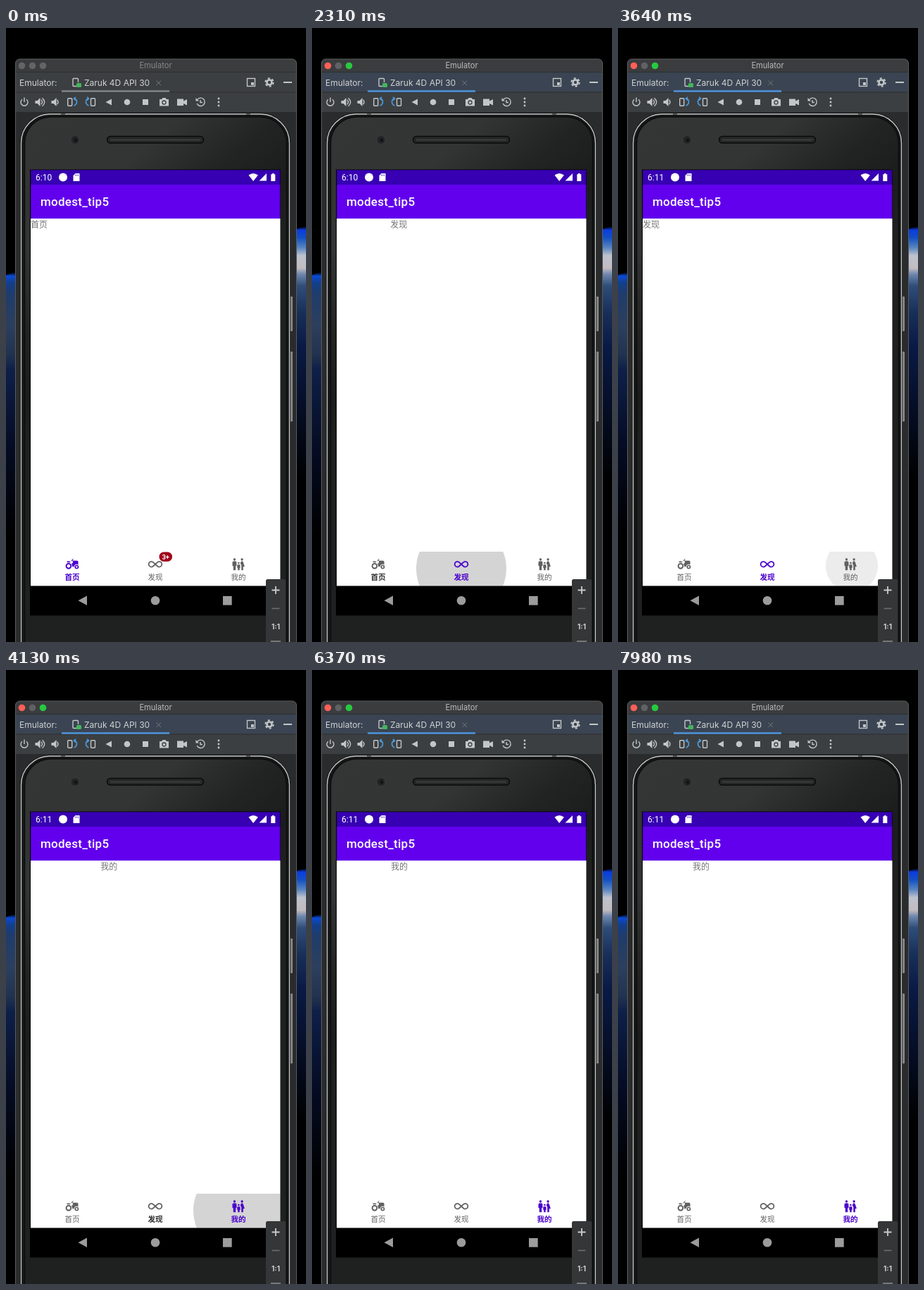
These frames come from a looping animation (426x870 px, 8000 ms). An HTML page:

```html
<!DOCTYPE html>
<html lang="zh">
<head>
<meta charset="utf-8">
<title>Emulator</title>
<style>
  html, body { margin: 0; width: 100%; height: 100%; overflow: hidden; background: #000; }
  svg { display: block; }
  text { white-space: pre; }
  .ui { font-family: Inter, sans-serif; font-size: 12px; fill: #d0d2d3; }
  .app { font-family: Roboto, sans-serif; fill: #fff; }
  .cjk { font-family: "Noto Sans CJK SC", "Noto Sans CJK", "Noto Sans", sans-serif; }
  .page { font-size: 12px; fill: #767676; }
  .label { font-size: 10.6px; text-anchor: middle; }
  .line { fill: none; stroke: #c3c6c8; stroke-width: 1.4; }
  .fill { fill: #c3c6c8; }
  .blue { fill: none; stroke: #4a9be0; stroke-width: 1.7; }
</style>
</head>
<body>
<svg width="426" height="870" viewBox="0 0 426 870">
  <defs>
    <linearGradient id="skyL" gradientUnits="userSpaceOnUse" x1="0" y1="346" x2="0" y2="720">
      <stop offset="0" stop-color="#000"/>
      <stop offset=".015" stop-color="#0a4ad6"/>
      <stop offset=".04" stop-color="#123f8c"/>
      <stop offset=".08" stop-color="#1f3c6c"/>
      <stop offset=".2" stop-color="#2c3f5e"/>
      <stop offset=".31" stop-color="#22334f"/>
      <stop offset=".37" stop-color="#0e1f48"/>
      <stop offset=".65" stop-color="#050c24"/>
      <stop offset="1" stop-color="#000"/>
    </linearGradient>
    <linearGradient id="skyR" gradientUnits="userSpaceOnUse" x1="0" y1="281" x2="0" y2="640">
      <stop offset="0" stop-color="#000"/>
      <stop offset=".015" stop-color="#0b3ce0"/>
      <stop offset=".045" stop-color="#1250c4"/>
      <stop offset=".085" stop-color="#5a86c0"/>
      <stop offset=".115" stop-color="#bdc2ce"/>
      <stop offset=".165" stop-color="#c3bcc0"/>
      <stop offset=".19" stop-color="#6d86ad"/>
      <stop offset=".235" stop-color="#2f4d7a"/>
      <stop offset=".34" stop-color="#182f58"/>
      <stop offset=".47" stop-color="#0a1a46"/>
      <stop offset="1" stop-color="#000"/>
    </linearGradient>
    <linearGradient id="shell" gradientUnits="userSpaceOnUse" x1="26" y1="126" x2="260" y2="400">
      <stop offset="0" stop-color="#343535"/>
      <stop offset=".4" stop-color="#333434"/>
      <stop offset=".65" stop-color="#222323"/>
      <stop offset=".85" stop-color="#1b1c1c"/>
      <stop offset="1" stop-color="#1f2020"/>
    </linearGradient>
    <clipPath id="screen"><rect x="35" y="201" width="354.500" height="589.500"/></clipPath>
    <clipPath id="bar"><rect x="35" y="742" width="354.500" height="48.500"/></clipPath>
  </defs>

  <path d="M0 350L14 345V790H0z" fill="url(#skyL)"/>
  <path d="M412 285L426 281V640H412z" fill="url(#skyR)"/>

  <!-- window -->
  <path d="M13.500 880V50a6 6 0 0 1 6-6H406.500a6 6 0 0 1 6 6V880z" fill="#2a2b2c"/>
  <path d="M13.500 119V50a6 6 0 0 1 6-6H406.500a6 6 0 0 1 6 6V119z" fill="#3c3f41"/>
  <path d="M14 63V50a6 6 0 0 1 6-6H406a6 6 0 0 1 6 6V63z" fill="#3b3c3e"/>
  <rect id="strip" x="14" y="63" width="398" height="27.500"/>
  <path d="M14 62.500H412M14 91H412" stroke="#2c2e30"/>
  <path d="M13.500 880V50a6 6 0 0 1 6-6H406.500a6 6 0 0 1 6 6V880" fill="none" stroke="#5a5c5e"/>
  <g id="lights"><circle cx="22.500" cy="53.500" r="4.800"/><circle cx="37.500" cy="53.500" r="4.800"/><circle cx="52.500" cy="53.500" r="4.800"/></g>
  <text id="title" class="ui" x="212.500" y="57" text-anchor="middle" style="font-size:11.100px">Emulator</text>
  <text class="ui" x="19" y="82">Emulator:</text>
  <path class="line" d="M100 82.500H96a1 1 0 0 1-1-1V72.500a1 1 0 0 1 1-1h5.500a1 1 0 0 1 1 1V77"/>
  <rect x="100" y="78" width="7" height="6" rx="1.500" fill="#41b65b"/>
  <text class="ui" x="111" y="82">Zaruk 4D API 30</text>
  <path d="M213.500 74.500l6.500 6.500m0-6.500l-6.500 6.500" stroke="#76797b"/>
  <rect id="underline" x="79" y="88" width="153" height="3"/>
  <g class="line">
    <rect x="342.500" y="71.500" width="11" height="11"/>
    <path d="M394 77H406" stroke-width="2"/>
    <circle cx="374" cy="77" r="3.500" stroke-width="2.600"/>
    <circle cx="374" cy="77" r="5.700" stroke-width="2" stroke-dasharray="3 2.970"/>
  </g>
  <rect class="fill" x="348" y="77" width="4" height="4"/>

  <!-- toolbar -->
  <g class="line">
    <path d="M23 101.200a5 5 0 1 0 6 0M26 98.500V105"/>
    <path d="M50 101.800q3 3.200 0 6.400M51.500 99.300q6.500 5.700 0 11.400"/>
    <path d="M72.500 101.800q3 3.200 0 6.400"/>
    <rect x="87.700" y="99.700" width="6" height="10.600" rx="1"/>
    <rect x="120.500" y="99.700" width="6" height="10.600" rx="1"/>
    <path d="M271.500 102a5.700 5.700 0 1 1-.3 5M276 102v3.500h3"/>
  </g>
  <path class="blue" d="M96.500 100q4 .5 4 4.500t-4 5.500M99 98l-2.500 2 2.500 2.500M117.500 100q-4 .5-4 4.500t4 5.500M115 98l2.500 2-2.500 2.500"/>
  <g class="fill">
    <path d="M41.500 103h3l4-4v12l-4-4h-3zM64.500 103h3l4-4v12l-4-4h-3z"/>
    <path d="M150 100.500v9l-8.500-4.500zM194 101h8v8h-8zM269.500 99l4.500 4.500h-4.500z"/>
    <circle cx="172" cy="105" r="4.300"/>
    <path d="M218 101h3l1.500-2h4l1.500 2h3v9.500h-13z"/>
    <path d="M243 100.500h9v3l5-2.500v8.500l-5-2.500v3h-9z"/>
    <circle cx="302" cy="100" r="1.400"/><circle cx="302" cy="105" r="1.400"/><circle cx="302" cy="110" r="1.400"/>
  </g>
  <circle cx="224.500" cy="105.500" r="2.500" fill="none" stroke="#3c3f41" stroke-width="1.300"/>

  <!-- phone -->
  <path d="M404 381h2.500v48H404zM404 459h2.500v98H404z" fill="#77797a" stroke="#a9abac" stroke-width=".7"/>
  <rect x="20.500" y="121" width="383" height="800" rx="42" fill="#111" stroke="#0b0b0b"/>
  <rect x="21.500" y="122" width="381" height="800" rx="41" fill="#161717" stroke="#c7c9ca" stroke-width="1.400"/>
  <rect x="26.500" y="126" width="372" height="800" rx="37" fill="url(#shell)" stroke="#0c0c0c" stroke-width="1.500"/>
  <path d="M78 122h6M341 122h6" stroke="#555" stroke-width="2"/>
  <circle cx="98" cy="158.500" r="6" fill="#222324" stroke="#3a3b3b"/>
  <circle cx="99" cy="159" r="2.200" fill="#111214"/>
  <rect x="143.500" y="153.500" width="137" height="9.500" rx="4.700" fill="#252626" stroke="#0a0a0a" stroke-width="1.600"/>
  <path d="M148 158.500H276" stroke="#3c3d3d" stroke-width="2"/>

  <!-- screen -->
  <rect x="34" y="200.500" width="356" height="632" fill="#000"/>
  <rect x="35" y="201" width="354.500" height="21" fill="#3700b3"/>
  <rect x="35" y="222" width="354.500" height="48" fill="#6200ee"/>
  <path d="M35.500 270V201.500H389V270" fill="none" stroke="#000" stroke-opacity=".25"/>
  <rect x="35" y="270" width="354.500" height="520.500" fill="#fff"/>
  <text id="clock" class="app" x="42" y="216" font-size="12"></text>
  <g fill="#fff">
    <circle cx="81" cy="211.500" r="6"/>
    <path d="M98.500 206h6v11h-9v-8z"/>
    <path d="M344.500 208.500q6.700-5 13.400 0L351.200 217zM370 206v10.500H359.500zM376.300 207.300h1.700V206h2.600v1.300h1.700V217h-6z"/>
  </g>
  <path d="M98.500 207.500v2M100.500 207.500v2M102.500 207.500v2" stroke="#3700b3" stroke-width=".8"/>
  <text class="app" x="49" y="252.300" font-size="17" font-weight="500" letter-spacing=".25">modest_tip5</text>
  <g id="pages" clip-path="url(#screen)"></g>
  <g clip-path="url(#bar)"><circle id="ripple"/></g>
  <g id="tabs"></g>
  <g id="badge">
    <rect x="217.500" y="742.500" width="18.500" height="13.500" rx="6.500" fill="#a00019"/>
    <text class="app" x="226.700" y="752.500" font-size="9.500" font-weight="700" text-anchor="middle">3+</text>
  </g>
  <g fill="#9c9c9c">
    <path d="M115 804.500v13.500l-12.500-6.700z"/>
    <circle cx="212" cy="811.300" r="6.300"/>
    <rect x="308" y="805" width="12.700" height="12.700"/>
  </g>

  <!-- zoom panel -->
  <rect x="369" y="781" width="28.300" height="100" rx="2.500" fill="#343637"/>
  <path d="M377.500 796.500h11M383 791v11" stroke="#c9cbcc" stroke-width="1.800"/>
  <path d="M377.500 822.500h11" stroke="#6b6e70" stroke-width="1.600"/>
  <text class="ui" x="383" y="851.500" text-anchor="middle" style="font-size:10px;font-weight:700">1:1</text>
  <path d="M376 869h14" stroke="#8b8e90" stroke-width="1.500"/>
</svg>
<script>
const LOOP = 8000, STEP = 70, WIDTH = 355, SETTLE = 400;
const NAMES = ["首页", "发现", "我的"];
const CENTERS = [94, 212, 330];
const TAPS = [
  { tab: 1, press: 1750, release: 2204 },
  { tab: 2, press: 3640, release: 4040 }
];
const FOCUS = 1680, MINUTE = 3360;
// time, distance dragged to the right
const DRAG = [
  [6230, 0], [6300, 25], [6370, 77], [6440, 118], [6580, 150], [6650, 140],
  [6790, 45], [6930, 0], [7770, 0], [7840, 8], [7910, 35], [7980, 71]
];
const ICONS = [
  `<path d="M19.500 12c.93 0 1.780.28 2.500.76V8c0-1.100-.9-2-2-2h-6.290l-1.060-1.060 1.410-1.410-.71-.71-3.530 3.530.71.71 1.410-1.410L13 6.710V9c0 1.100-.9 2-2 2h-.54c.95 1.060 1.540 2.460 1.540 4 0 .34-.04.67-.09 1h3.140c.25-2.250 2.140-4 4.450-4zM4 9h5c0-1.100-.9-2-2-2H4c-.55 0-1 .45-1 1s.45 1 1 1z"/>
   <g fill="none" stroke="currentColor" stroke-width="2"><circle cx="19.500" cy="16.500" r="2.500"/><circle cx="6" cy="15" r="3.900" stroke-width="2.300"/></g>`,
  `<path fill="none" stroke="currentColor" stroke-width="2.100" d="M9.800 14.100L8.500 15.200C7.700 16 6.700 16.400 5.400 16.400A4.400 4.400 0 0 1 5.400 7.600C6.700 7.600 7.700 8 8.500 8.800L15.500 15.200C16.300 16 17.300 16.400 18.600 16.400A4.400 4.400 0 0 0 18.600 7.600C17.300 7.600 16.300 8 15.500 8.800L8.500 15.200"/>`,
  `<path d="M20 22v-6h2.500l-2.540-7.630A2 2 0 0 0 18.060 7h-.12a2 2 0 0 0-1.900 1.370l-.86 2.580A3.500 3.500 0 0 1 17 14v8zM7.500 22v-7H9V9a2 2 0 0 0-2-2H4a2 2 0 0 0-2 2v6h1.500v7zM14 22v-4h1v-4a1.500 1.500 0 0 0-1.500-1.500h-2A1.500 1.500 0 0 0 10 14v4h1v4z"/>
   <circle cx="18" cy="4" r="2"/><circle cx="5.500" cy="4" r="2"/><circle cx="12.500" cy="10" r="1.500"/>`
];

const $ = id => document.getElementById(id);
const clamp = v => Math.max(0, Math.min(1, v));
const set = (el, attrs) => { for (const k in attrs) el.setAttribute(k, attrs[k]); };

$("pages").innerHTML = NAMES.map(n => `<text class="cjk page" y="283">${n}</text>`).join("");
$("tabs").innerHTML = NAMES.map((n, i) => `<g>
  <g transform="translate(${CENTERS[i] - 10.2} 749.600) scale(.85)" fill="currentColor">${ICONS[i]}</g>
  <text class="cjk label" x="${CENTERS[i]}" y="782" fill="currentColor">${n}</text></g>`).join("");
const pages = [...$("pages").children], tabs = [...$("tabs").children];
const lights = [...$("lights").children];

function dragAt(t) {
  for (let i = 1; i < DRAG.length; i++) {
    const [t0, a] = DRAG[i - 1], [t1, b] = DRAG[i];
    if (t >= t0 && t <= t1) return a + (b - a) * (t - t0) / (t1 - t0);
  }
  return 0;
}

function drawWindow(t) {
  const on = t >= FOCUS;
  const colors = on ? ["#ff5f57", "#5f6163", "#28c840"] : Array(3).fill("#626466");
  lights.forEach((el, i) => set(el, { fill: colors[i] }));
  $("title").style.fill = on ? "#b9bbbc" : "#858789";
  set($("strip"), { fill: on ? "#3a4452" : "#3c3f41" });
  set($("underline"), { fill: on ? "#4a88c7" : "#747a80" });
}

function drawPages(t) {
  const pos = TAPS.reduce((p, { release }) =>
    p + 1 - (1 - clamp((t - release) / SETTLE)) ** 5, 0) - dragAt(t) / WIDTH;
  pages.forEach((el, i) => set(el, { x: 35 + WIDTH * (i - pos) }));
}

function drawTabs(t) {
  const done = TAPS.filter(p => t >= p.release);
  const current = done.length;
  const leaving = current && t - done[current - 1].release < 140 ? current - 1 : -1;
  tabs.forEach((el, i) => {
    const label = el.lastElementChild;
    el.style.color = i === current ? "#4a00cb" : "#616161";
    label.style.fill = i === leaving ? "#303030" : "currentColor";
    label.style.fontWeight = i === current || i === leaving ? 700 : 400;
  });
  $("badge").style.display = current ? "none" : "";
}

function drawRipple(t) {
  const tap = TAPS.find(p => t >= p.press && t < p.release + 360);
  const el = $("ripple");
  if (!tap) return set(el, { r: 0 });
  const age = t - tap.press, rest = 1 - clamp(age / 210);
  const fade = 1 - clamp((t - tap.release - 110) / 250);
  set(el, {
    cx: CENTERS[tap.tab] + 2 * rest,
    cy: 766 - 4 * rest,
    r: 64 * (1 - .42 * rest * rest),
    "fill-opacity": (.075 + .095 * clamp(age / 140)) * fade
  });
}

function draw(time) {
  const t = Math.floor(time % LOOP / STEP) * STEP;
  drawWindow(t);
  drawPages(t);
  drawTabs(t);
  drawRipple(t);
  $("clock").textContent = t < MINUTE ? "6:10" : "6:11";
}

const start = performance.now();
function tick() {
  draw(performance.now() - start);
  requestAnimationFrame(tick);
}
tick();
</script>
</body>
</html>
```
